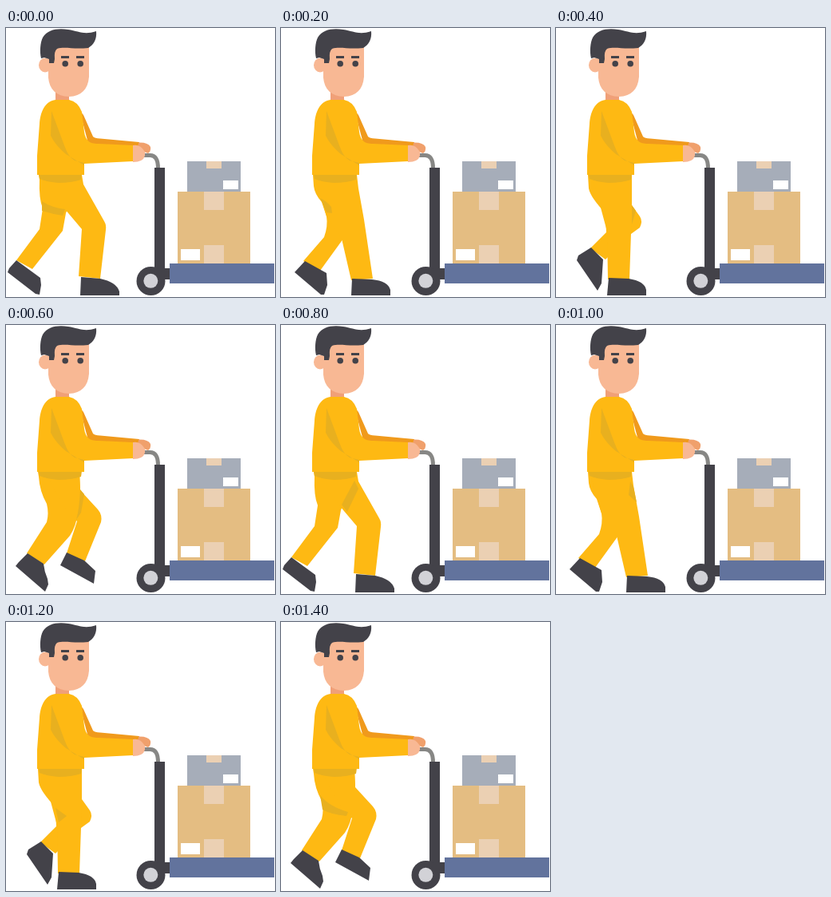
Write an HTML page that moves like this. It is 337 px wide and 337 px high and loops after 1.6 s.

```html
<!DOCTYPE html>
<html lang="en">
<head>
<meta charset="utf-8">
<title>Worker pushing a trolley</title>
<style>
html, body { margin: 0; width: 100%; height: 100%; overflow: hidden; background: #fff; }
svg { display: block; width: 100%; height: 100%; }
.suit { fill: #feb913; }
.fold { fill: #e8b01f; }
.dark { fill: #434249; }
.skin { fill: #f8b894; }
</style>
</head>
<body>
<svg viewBox="0 0 337 337">
  <g id="legs">
    <path class="suit" id="back"/>
    <path class="suit" id="front"/>
    <path class="fold" id="shade"/>
    <path class="dark" id="shoes"/>
    <path class="fold" d="M41 183H95L94 190Q82 194 66 194Q51 193 42 189Z"/>
  </g>

  <g id="trolley">
    <path d="M173 159.500H180Q190.500 159 190.500 176" fill="none" stroke="#878785" stroke-width="5"/>
    <path class="dark" d="M186 175H199V301H205V315H186Z"/>
    <circle class="dark" cx="181.500" cy="317" r="18"/>
    <circle cx="181.300" cy="316.800" r="9" fill="#d2d2d7"/>
    <path fill="#62739d" d="M205 295H336V320H205Z"/>
    <path fill="#e4bd82" d="M215 205H306V295H215Z"/>
    <path fill="#a6adb9" d="M227 167H294V205H227Z"/>
    <path fill="#ebd0b3" d="M248 205H273V228H248ZM248 272H273V295H248ZM251 167H270V176H251Z"/>
    <path fill="#fff" d="M219 277H243V291H219ZM272 191H291V202H272Z"/>
  </g>

  <g id="body">
    <path fill="#f09a1c" d="M92 103L97 109L109 136Q111 138 118 138.500L167 143V150L104 148Z"/>
    <path fill="#f0a06c" d="M166 143.500Q178 143 181 149Q182 154 178 157L165 152Z"/>
    <path fill="#f0a078" d="M62 76H79V93H62Z"/>
    <path class="suit" d="M62 90H79Q90 92 95 105L98 130Q99 139 105 143Q109 145 116 145L159 147V167L98 170L98 184H39L39 160L42 120C43 106 48 92 62 90Z"/>
    <path class="fold" d="M57 104L56 135Q62 147 75 158L98 172V169L86 166Q78 162 73 147Z"/>
    <path class="skin" d="M159 147Q168 145 174 155V160Q172 168 159 168Z"/>
  </g>

  <g id="head">
    <ellipse class="skin" cx="49" cy="46.500" rx="8" ry="9"/>
    <path class="skin" d="M53 23H104V61Q102 85 79 86Q55 85 53 62Z"/>
    <path class="dark" d="M44 38C42 29 43 18 46 12C52 2 64 0 78 2C91 4 98 9 113 4C114 14 110 21 103 25C84 27 74 23 64 26Q60 29 61 39L60 44H54V39L48 37Z"/>
    <path class="dark" d="M69 35H79V38H69ZM88 35H98V38H88Z"/>
    <circle class="dark" cx="74.200" cy="44.700" r="3.800"/>
    <circle class="dark" cx="93.200" cy="44.700" r="3.800"/>
  </g>
</svg>
<script>
// Four leg poses make one step; shade holds the fold for either leg being nearer.
const poses = [
  {
    back: "M41 184H94L75 232L71 254L33 302L13 291L42 252L46 226Q41 214 42 190Z",
    front: "M45 184H95L97 196L123 242Q126 247 125 253L118 314L91 311L95 252L73 226Z",
    shoes: "M13 291L43 313L44 322L42 334L37 333L2 306L4 301ZM94 312L118 314Q138 318 142 330V335H93Z",
    shade: ["M45 217Q57 225 74 227L71 235Q58 233 45 229Z", "M92 195L97 205L83 234L76 225Z"]
  },
  {
    back: "M40 184H92L78 264L49 304L28 292L54 262Q59 248 57 236L51 218Q42 208 41 198Z",
    front: "M42 184H95L97 201L104 240L115 314L88 316L76 264L57 236Z",
    shoes: "M30 292L57 307L58 322L54 334H50L17 306ZM89 314L114 315Q134 317 137 328V335H88Z",
    shade: ["M49 213Q57 217 63 224L64 232L57 231Z", "M93 196L97 203L101 222L91 213Z"]
  },
  {
    back: "M40 184H95L95 222L105 236Q109 242 105 250L94 258L62 290L43 276L63 256L62 232Q43 212 41 201Z",
    front: "M45 184H95L95 225L94 257L92 315H65L64 255Z",
    shoes: "M44 275L59 290L57 320L52 329L26 291L28 285ZM66 313L91 314Q111 317 113 328V335H64Z",
    shade: ["M95 222L100 229L95 246Z", "M62 233L76 243L66 251Z"]
  },
  {
    back: "M40 184H92L93 207L90 235Q88 252 80 264L48 300L26 286L51 247Q54 236 51 224Q42 208 41 190Z",
    front: "M48 184H92L93 207L115 231Q121 238 119 247L99 296L76 286L89 246L75 230Z",
    shoes: "M27 286L47 299Q48 309 52 318L53 325L49 334L12 302L16 297ZM76 285L98 295L112 308L110 324L68 301Z",
    shade: ["M93 206L98 212L94 235L88 244Q92 230 93 206Z", "M49 217Q60 231 84 238L82 243Q62 241 52 235Z"]
  }
];
// Whether the nearer leg is the forward one decides where its fold falls.
const foldSide = [0, 0, 0, 0, 1, 1, 1, 1];
const stepTime = 200;
const part = id => document.getElementById(id);
const parts = Object.fromEntries(["back", "front", "shade", "shoes"].map(id => [id, part(id)]));
let shown = -1;

function draw(now) {
  const step = Math.floor(now / stepTime) % foldSide.length;
  if (step !== shown) {
    const pose = poses[step % poses.length];
    for (const id in parts) {
      parts[id].setAttribute("d", id === "shade" ? pose.shade[foldSide[step]] : pose[id]);
    }
    shown = step;
  }
}

const start = performance.now();
function tick() {
  draw(performance.now() - start);
  requestAnimationFrame(tick);
}
tick();
</script>
</body>
</html>
```
